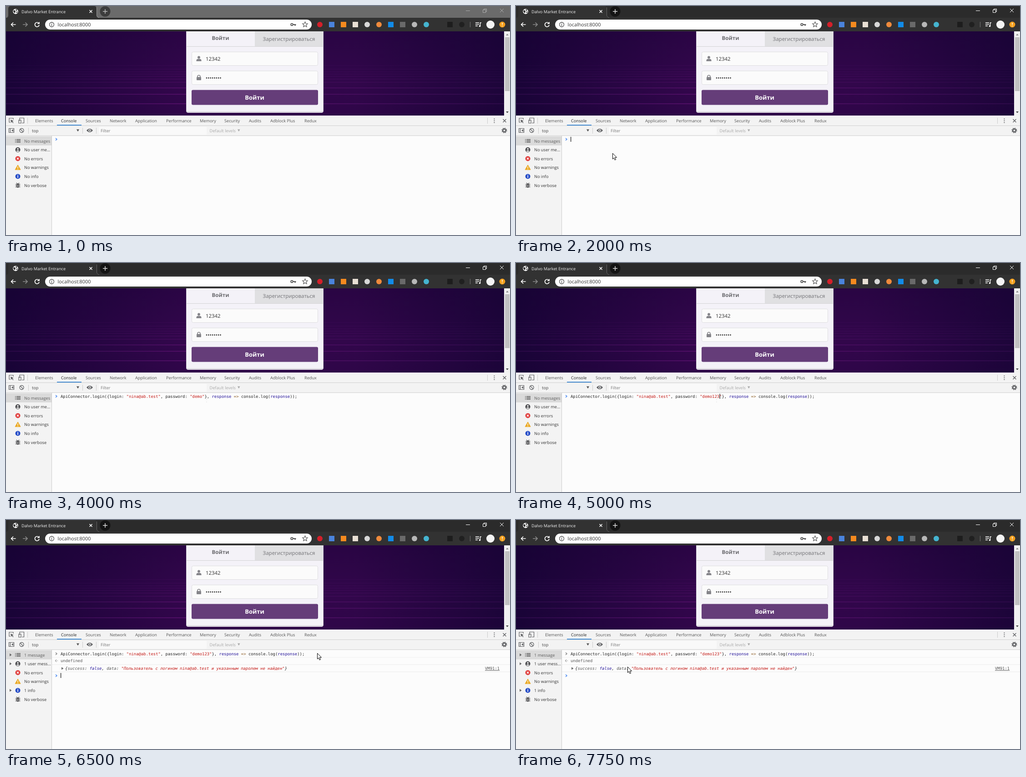
An HTML page that plays this animation: 1108 px wide and 506 px high, repeating every 8000 ms.

```html
<!DOCTYPE html>
<html lang="ru">
<head>
<meta charset="utf-8">
<title>Console login</title>
<style>
  html, body { margin: 0; width: 100%; height: 100%; overflow: hidden; background: #fcfcfc; }
  svg { display: block; width: 1108px; height: 506px; }
  text { font: 9.2px "Open Sans", "Noto Sans", sans-serif; white-space: pre; text-rendering: geometricPrecision; }
  .mono { font: 8.92px "DejaVu Sans Mono", "Liberation Mono", monospace; fill: #222; }
  .out { font-style: italic; }
  .str { fill: #c41a16; }
  .var { fill: #221199; }
  .op { fill: #8a5a20; }
  .key { fill: #565656; }
  .line { fill: none; stroke-width: 1.4; }
</style>
</head>
<body>
<svg id="stage" viewBox="0 0 1108 506" xmlns="http://www.w3.org/2000/svg"></svg>
<script>
const CHAR = 8.92 * 0.602;
const CODE_X = 120;
const EMAIL = 'nina@ab.test';

const rect = (x, y, w, h, fill, more = '') =>
  `<rect x="${x}" y="${y}" width="${w}" height="${h}" fill="${fill}" ${more}/>`;
const circle = (x, y, r, fill, more = '') =>
  `<circle cx="${x}" cy="${y}" r="${r}" fill="${fill}" ${more}/>`;
const path = (d, fill, more = '') => `<path d="${d}" fill="${fill}" ${more}/>`;
const stroke = (d, color, width = 1.4) =>
  `<path class="line" d="${d}" style="stroke:${color};stroke-width:${width}"/>`;
const text = (x, y, s, fill = '#444', more = '') => `<text x="${x}" y="${y}" fill="${fill}" ${more}>${s}</text>`;
const size = (px, weight = 400) => `style="font-size:${px}px;font-weight:${weight}"`;
const span = (cls, s) => `<tspan class="${cls}">${s}</tspan>`;

const star = (cx, cy, r) => 'M' + Array.from({ length: 10 }, (_, i) => {
  const a = i * Math.PI / 5 - Math.PI / 2, d = i % 2 ? r * 0.45 : r;
  return `${(cx + d * Math.cos(a)).toFixed(1)} ${(cy + d * Math.sin(a)).toFixed(1)}`;
}).join('L') + 'Z';

function titleBar(active) {
  const control = active ? '#fff' : '#aaa';
  return rect(0, 0, 1108, 26, active ? '#2b2b2b' : '#6b6b6b') +
    path('M0 26Q5 26 5 20V6Q5 0 10 0H194Q199 0 199 6V20Q199 26 205 26Z', '#323232') +
    stroke('M199.5 3V20Q199.5 25 205 25.5', active ? '#666' : '#999', 1) +
    circle(21, 12, 5.8, '#fff') +
    path('M17 9l3 1 1 3-2 3-3-4zM22 7l3 2-2 2-2-2zM22 13l4-1-2 4z', '#323232') +
    text(34, 16, 'Dalvo Market Entrance', '#f2f2f2') +
    stroke('M183.5 9l6 6m0-6l-6 6', '#fff', 1.5) +
    circle(218, 12, 11.5, active ? '#141414' : '#3c3c3c') +
    stroke('M213 12h10M218 7v10', active ? '#ddd' : '#bbb', 1.5) +
    stroke('M1011 10.5h9M1048.5 8.5h6v6h-6zM1050.5 8v-1.5h6v6h-1.5M1086 6l8 8m0-8l-8 8', control, 1);
}

function toolbar() {
  // Extension badges: x, colour, round or square
  const badges = [
    [690, '#d3202a', 1], [716, '#4a83dc', 0], [742, '#f58a1f', 0], [768, '#e8dfd4', 0],
    [794, '#d8d8d8', 1], [820, '#ef8a3c', 1], [846, '#128be8', 0], [872, '#6a6a6a', 0],
    [898, '#b8b8b8', 1], [924, '#45b4d0', 1], [976, '#1d1d1d', 0], [1002, '#202020', 1]
  ];
  return rect(0, 26, 1108, 30, '#323232') +
    stroke('M21.5 41h-10m4.5-4.5L11.5 41l4.5 4.5', '#fff', 1.7) +
    stroke('M37 41h10m-4.5-4.5L47 41l-4.5 4.5', '#8a8a8a', 1.7) +
    stroke('M72 38a4.8 4.8 0 1 0 1 4M73 35.5v3.5h-4', '#fff', 1.7) +
    rect(86, 30, 586, 22, '#fff', 'rx="11"') +
    circle(100.5, 41, 5, 'none', 'stroke="#555" stroke-width="1.3"') +
    stroke('M100.5 40v4M100.5 37.8v1.2', '#555', 1.3) +
    text(113.5, 45, 'localhost:8000', '#333', size(10.8)) +
    circle(628.5, 41, 2.3, 'none', 'stroke="#555" stroke-width="1.8"') +
    stroke('M631 41h6.5M635.5 41v3', '#555', 2) +
    path(star(657.5, 41, 6), 'none', 'stroke="#555" stroke-width="1.2"') +
    badges.map(([x, c, round]) => round ? circle(x, 41, 6, c) : rect(x - 6, 35, 12, 12, c)).join('') +
    rect(1020, 35, 1, 12, '#777') +
    stroke('M1032 37h8M1032 40.5h8M1032 44h5M1042.5 45v-8h2.5', '#fff', 1.5) +
    circle(1041.5, 44.5, 1.8, '#fff') +
    circle(1065, 41, 9, '#f4f4f4') +
    circle(1091, 41, 6.5, '#f5a01d') + stroke('M1091 37v4.5M1091 43.5v1.5', '#fff', 1.5);
}

function page() {
  const floorLines = [131, 139, 145, 150, 155, 161, 168, 180, 194, 215];
  const field = y => rect(408.5, y + 0.5, 277, 30, '#fbfbfb', 'rx="3" stroke="#dedee0"');
  return `<defs>
    <linearGradient id="night"><stop stop-color="#1a0438"/><stop offset=".35" stop-color="#35074e"/>
      <stop offset=".7" stop-color="#34074d"/><stop offset="1" stop-color="#1e053b"/></linearGradient>
    <linearGradient id="glow"><stop stop-color="#5b1a75" stop-opacity=".5"/><stop offset=".4" stop-color="#751785"/>
      <stop offset="1" stop-color="#5b1a75" stop-opacity=".5"/></linearGradient>
    <linearGradient id="horizon" x2="0" y2="1"><stop stop-color="#10002c" stop-opacity=".3"/>
      <stop offset=".6" stop-color="#10002c" stop-opacity=".06"/><stop offset="1" stop-color="#10002c" stop-opacity=".15"/></linearGradient>
    </defs>` +
    rect(0, 56, 1095, 186, 'url(#night)') + rect(0, 56, 1095, 186, 'url(#horizon)') +
    floorLines.map((y, i) => rect(0, y, 1095, i > 6 ? 2 : 1, 'url(#glow)', `opacity="${0.16 + i * 0.04}"`)).join('') +
    rect(1095, 56, 13, 186, '#f1f1f1') + rect(1097, 69, 10, 119, '#c1c1c1') +
    path('M1099 65l3-3.5 3 3.5z', '#888') + path('M1099 233l3 3.5 3-3.5z', '#444') +
    path('M396.5 56V232Q396.5 235.500 400 235.500H694Q697.5 235.500 697.5 232V56', '#f4f2f8', 'stroke="#d4d1d9"') +
    rect(547, 56, 150, 33, '#e0e0e2') + rect(397, 89, 300, 1, '#d4d4d5') +
    rect(397, 233, 300, 1, '#c9c7cc') +
    text(471.5, 75, 'Войти', '#6a6a6e', `text-anchor="middle" ${size(11.6, 700)}`) +
    text(622, 77, 'Зарегистрироваться', '#737377', `text-anchor="middle" ${size(11.5)}`) +
    field(101) + field(143) +
    circle(424, 113.5, 2.9, '#85858a') + path('M418.5 122v-1.5Q418.5 117 422 117h4Q429.5 117 429.5 120.5V122Z', '#85858a') +
    rect(419, 157, 10, 7, '#85858a', 'rx="1"') + stroke('M421 158v-2a3 3 0 0 1 6 0v2', '#85858a', 1.7) +
    text(439, 121, '12342', '#333', size(11.4)) +
    Array.from({ length: 8 }, (_, i) => circle(441 + i * 4.35, 159, 1.35, '#222')).join('') +
    rect(408, 185.5, 278, 33, '#653d79', 'rx="3"') +
    text(546.5, 207, 'Войти', '#fff', `text-anchor="middle" ${size(13, 700)}`);
}

function devtools() {
  const tabs = [[64, 'Elements'], [121, 'Console'], [175, 'Sources'], [228, 'Network'], [284, 'Application'],
    [352, 'Performance'], [426, 'Memory'], [480, 'Security'], [534, 'Audits'], [581, 'Adblock Plus'], [656, 'Redux']];
  const grey = '#5f6063';
  return rect(0, 242, 1108, 264, '#fcfcfc') + rect(0, 242, 1108, 45, '#f3f3f3') +
    rect(0, 264, 1108, 1, '#d0d0d0') + rect(0, 286, 1108, 1, '#d0d0d0') +
    tabs.map(([x, s]) => text(x, 257, s, s === 'Console' ? '#222' : '#555')).join('') +
    rect(112, 262.5, 54, 1.5, '#1b78d4') +
    stroke('M10 257H7v-9h9v3', grey, 1.2) + path('M10 251l7 3-3 1 2.5 3-1 1-2.5-3-1.5 2z', grey) +
    stroke('M30 254v-6.5h9.5v11H35M28 252h5v7h-5z', grey, 1.2) +
    rect(47, 247, 1, 13, '#ccc') + rect(1058, 247, 1, 13, '#ccc') +
    [249.5, 253.5, 257.5].map(y => circle(1073.5, y, 1.1, grey)).join('') +
    stroke('M1092.5 250l7 7m0-7l-7 7', grey) +
    stroke('M6.5 270.5h11v9h-11zM9.5 270v10', grey, 1.2) + path('M12 275l4-3v6z', grey) +
    circle(34.5, 275, 4.5, 'none', `stroke="${grey}" stroke-width="1.3"`) + stroke('M31.5 272l6 6', grey, 1.3) +
    [49, 168, 198].map(x => rect(x, 269, 1, 13, '#ccc')).join('') +
    text(57, 279, 'top') + path('M155 272.5h6l-3 5z', '#555') +
    path('M177 275q7-8 14 0q-7 8-14 0z', grey) + circle(184, 275, 2.8, '#f3f3f3') + circle(184, 275, 1.6, grey) +
    rect(204, 267, 237, 17, '#f9f9f9') + text(208, 279, 'Filter', '#777') +
    text(447.5, 279, 'Default levels', '#aaa') + path('M509 272.5h5.5l-2.7 5z', '#aaa') +
    circle(1095.5, 275, 3.3, 'none', `stroke="${grey}" stroke-width="2.4"`) +
    circle(1095.5, 275, 5.2, 'none', `stroke="${grey}" stroke-width="1.8" stroke-dasharray="2 2.08"`);
}

function sidebar(done) {
  const labels = done
    ? ['1 message', '1 user mess…', 'No errors', 'No warnings', '1 info', 'No verbose']
    : ['No messages', 'No user me…', 'No errors', 'No warnings', 'No info', 'No verbose'];
  const rowY = i => 298 + i * 19.6;
  const icons = [
    stroke('M-3 -3H6M-3 0H6M-3 3H6M-6 -3h1.5M-6 0h1.5M-6 3h1.5', '#555'),
    circle(0, 0, 5.5, '#505053') + circle(0, -1.7, 1.8, '#f3f3f3') + path('M-3.5 2.8q3.5-3 7 0q-3.5 3-7 0z', '#f3f3f3'),
    circle(0, 0, 5.5, '#e0403f') + stroke('M-2 -2l4 4m0-4l-4 4', '#fff'),
    path('M0 -5.5L6 5H-6Z', '#eaa924', 'stroke="#eaa924" stroke-linejoin="round"') + stroke('M0 -2v3.5M0 2.5v1.5', '#fff'),
    circle(0, 0, 5.5, '#2a50c8') + stroke('M0 -1v4M0 -3.5v1.5', '#fff', 1.7),
    rect(-3, -4, 6, 9.5, '#505053', 'rx="3"') +
      stroke('M-5.5 -2H5.5M-5.5 1H5.5M-5.5 4H5.5M-3 -5.5l1.5 2M3 -5.5l-1.5 2', '#505053', 1.2) +
      stroke('M-1.5 0h3M-1.5 2.5h3', '#f3f3f3', 1)
  ];
  return rect(0, 287, 100, 219, '#f3f3f3') + rect(100, 287, 1, 219, '#ccc') + rect(0, 288, 100, 20, '#dadada') +
    labels.map((s, i) => `<g transform="translate(26 ${rowY(i)})">${icons[i]}</g>` +
      text(40, rowY(i) + 3.5, s, i ? '#333' : '#5c5c5c') +
      (done && [0, 1, 4].includes(i) ? path(`M8 ${rowY(i) - 3.2}l4.5 3.2-4.5 3.2z`, '#6a6a6a') : '')).join('');
}

const chevron = (y, color) => stroke(`M109 ${y - 2.6}l3 2.6-3 2.6`, color, 1.3);
const mono = (x, y, s, cls = '') => `<text class="mono ${cls}" x="${x}" y="${y}">${s}</text>`;

function command(y, password) {
  return mono(CODE_X, y, 'ApiConnector.login({login: ' + span('str', `"${EMAIL}"`) + ', password: ' +
    span('str', `"${password}"`) + '}, ' + span('var', 'response') + ' ' + span('op', '=&gt;') +
    ' console.log(' + span('var', 'response') + '));');
}

function result() {
  return chevron(295.5, '#777') + command(299, 'demo123') +
    rect(101, 303, 1007, 1, '#f1f1f1') + rect(101, 319, 1007, 1, '#ececec') + rect(101, 335, 1007, 1, '#ececec') +
    stroke('M111 308.5l-2.5 2.5 2.5 2.5', '#999', 1.2) + circle(113, 311, 0.8, '#999') +
    mono(CODE_X, 314, span('key', 'undefined')) +
    path('M122 325l4.5 3-4.5 3z', '#6a6a6a') +
    mono(130, 331, '{' + span('key', 'success') + ': ' + span('var', 'false') + ', ' + span('key', 'data') + ': ' +
      span('str', `"Пользователь с логином ${EMAIL} и указанным паролем не найден"`) + '}', 'out') +
    mono(1053, 331, '<tspan text-decoration="underline" fill="#555">VM91:1</tspan>') +
    chevron(344, '#367cf1');
}

// Tracks hold each value from its time until the next one.
const tracks = {
  password: [[0, null], [2500, 'demo'], [4500, 'demo1'], [4750, 'demo12'], [5000, 'demo123']],
  caret: [[0, null], [2000, 0], [2500, 97], [3000, null], [3500, 58], [4000, null], [4250, 58], [4500, 59],
    [4750, 60], [5000, 61], [5500, null], [6250, 0], [6750, null], [7250, 0], [7750, null]],
  arrow: [[0, null], [1250, [250, 384]], [1500, [160, 362]], [1750, [190, 335]], [2000, [212, 325]], [2500, null],
    [6250, [684, 294]], [7000, [600, 318]], [7250, [430, 330]], [7500, [300, 328]], [7750, [245, 324]]],
  beam: [[0, null], [3500, [441, 302]], [5250, [560, 302]], [5500, [648, 302]], [6000, [692, 302]], [6250, null]]
};
const at = (track, t) => track.filter(([start]) => start <= t).pop()[1];

function pointer(t) {
  const arrow = at(tracks.arrow, t), beam = at(tracks.beam, t);
  if (arrow) return `<g transform="translate(${arrow})">` +
    path('M.5 .5V13.2L3.3 10.6L5.2 15.3L7.5 14.3L5.5 9.7H9.5Z', '#fff', 'stroke="#000"') + '</g>';
  return beam ? stroke(`M${beam[0]} ${beam[1] - 6}v2m0 3v2m0 3v2`, '#ddd', 1) : '';
}

function consoleState(t) {
  const done = t >= 6250, password = at(tracks.password, t), column = at(tracks.caret, t);
  const caret = column === null ? '' : rect(CODE_X + column * CHAR, done ? 338 : 289, 1.2, 11, '#111');
  const input = chevron(294.5, '#367cf1') + (password ? command(298, password) : '');
  return sidebar(done) + (done ? result() : input) + caret + pointer(t);
}

const stage = document.getElementById('stage');
stage.innerHTML = '<g id="title"></g>' + toolbar() + page() + devtools() + '<g id="live"></g>';
const title = document.getElementById('title');
const live = document.getElementById('live');

const LOOP = 8000, TICK = 250;
let shown = -1;
function frame() {
  const t = Math.floor(performance.now() % LOOP / TICK) * TICK;
  if (t !== shown) {
    shown = t;
    title.innerHTML = titleBar(t >= 2000);
    live.innerHTML = consoleState(t);
  }
  requestAnimationFrame(frame);
}
frame();
</script>
</body>
</html>
```
